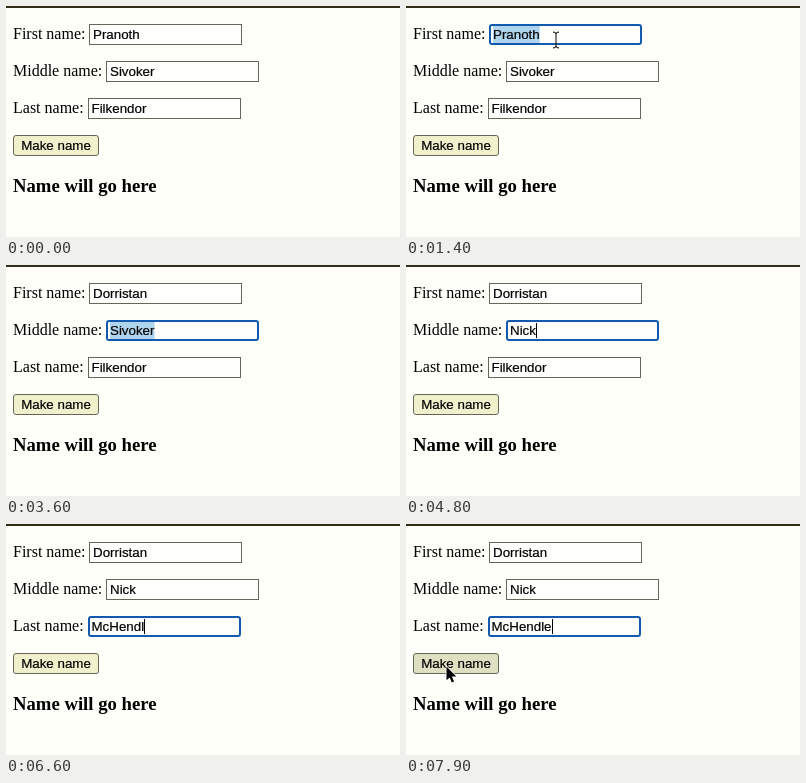
Animation of 394 by 231 pixels, one loop 8000 ms. Source, as an HTML page:

```html
<!DOCTYPE html>
<html lang="en">
<head>
<meta charset="utf-8">
<title>Name form</title>
<style>
  html, body { margin: 0; width: 100%; height: 100%; overflow: hidden; background: #fffffa; }
  svg { display: block; }
  text { fill: #000; }
  .serif { font: 16px "Liberation Serif", Times, serif; }
  .head { font: bold 18.72px "Liberation Serif", Times, serif; }
  .sans { font: 13.333px "Liberation Sans", Arial, sans-serif; stroke: #000; stroke-width: .2px; }
</style>
</head>
<body>
<svg id="stage" width="394" height="231" viewBox="0 0 394 231"></svg>
<script>
const LOOP = 8000, STEP = 100, BLINK = 500;
const INK = '#66655a', RING = '#125aae', BUTTON = '#f1f0cc', PRESSED = '#dfdfc2';
const stage = document.getElementById('stage');

function add(tag, attrs, text = '') {
  const el = document.createElementNS('http://www.w3.org/2000/svg', tag);
  set(el, attrs);
  el.textContent = text;
  stage.append(el);
  return el;
}
function set(el, attrs) {
  for (const k in attrs) el.setAttribute(k, attrs[k]);
}
function show(el, on) {
  el.style.display = on ? '' : 'none';
}

// Each field: focus and select times, then one time per typed letter.
const fields = [
  { label: 'First name:', x: 83, y: 18, pad: 4, before: 'Pranoth', after: 'Dorristan',
    focus: 1200, select: 1400, blur: 3600,
    keys: [2100, 2400, 2500, 2900, 3000, 3100, 3200, 3300, 3400] },
  { label: 'Middle name:', x: 100, y: 55, pad: 4, before: 'Sivoker', after: 'Nick',
    focus: 3600, select: 3600, blur: 5000, keys: [4300, 4500, 4600, 4800] },
  { label: 'Last name:', x: 82, y: 92, pad: 3.5, before: 'Filkendor', after: 'McHendle',
    focus: 5000, select: 5000, blur: LOOP,
    keys: [5400, 5600, 6000, 6300, 6400, 6500, 6600, 6800] }
];
const BOX_W = 153, BOX_H = 21;

add('rect', { width: 394, height: 2, fill: '#302d17' });

for (const f of fields) {
  const base = f.y + 15;
  add('text', { class: 'serif', x: 7, y: base }, f.label);
  f.box = add('rect', { fill: '#fffffd' });
  f.mark = add('rect', { x: f.x + f.pad, y: f.y + 2, height: 17, fill: '#afd4ee' });
  f.text = add('text', { class: 'sans', x: f.x + f.pad, y: base });
  f.caret = add('rect', { y: f.y + 3, width: 1, height: 15, fill: '#000' });
}

const button = add('rect', { x: 7.5, y: 129.5, width: 85, height: 20, rx: 2.5, stroke: INK });
add('text', { class: 'sans', x: 50, y: 144, 'text-anchor': 'middle' }, 'Make name');
add('text', { class: 'head', x: 7, y: 186 }, 'Name will go here');

const arrow = add('path', {
  d: 'M0 0V13.8L3.2 10.9 5.3 16 7.5 15 5.4 10.1H9.8Z',
  fill: '#000', stroke: '#fff', 'stroke-width': 1.6, 'paint-order': 'stroke'
});
const beam = add('path', {
  d: 'M-3 -8Q0 -8 0 -6Q0 -8 3 -8M0 -6V6M-3 8Q0 8 0 6Q0 8 3 8', fill: 'none', stroke: '#000'
});

// Mouse trips as [time, x, y]; typing hides the pointer.
const trips = [
  { end: 2100, path: [[100, 330, 232], [300, 250, 174], [600, 250, 174], [800, 186.5, 41.5], [1200, 150, 34]] },
  { end: LOOP, path: [[7200, 150, 34], [7800, 40.5, 142.5]] }
];

function pointAt(path, t) {
  for (let i = 1; i < path.length; i++) {
    const [t0, x0, y0] = path[i - 1], [t1, x1, y1] = path[i];
    if (t < t1) {
      const p = (t - t0) / (t1 - t0), e = p * p * (3 - 2 * p);
      return [x0 + (x1 - x0) * e, y0 + (y1 - y0) * e];
    }
  }
  return path[path.length - 1].slice(1);
}

// The border lies fully inside the box, whatever its width.
function drawBox(f, focused) {
  const line = focused ? 2 : 1;
  set(f.box, {
    x: f.x + line / 2, y: f.y + line / 2, width: BOX_W - line, height: BOX_H - line,
    rx: focused ? 2 : 0, stroke: focused ? RING : INK, 'stroke-width': line
  });
}

function drawField(f, t) {
  const typed = f.keys.filter(k => k <= t).length;
  const focused = t >= f.focus && t < f.blur;
  const selected = focused && t >= f.select && !typed;
  f.text.textContent = typed ? f.after.slice(0, typed) : f.before;
  drawBox(f, focused);

  const width = f.text.getComputedTextLength();
  set(f.mark, { width });
  show(f.mark, selected);
  const last = typed ? f.keys[typed - 1] : f.focus;
  set(f.caret, { x: Math.round(f.x + f.pad + width) });
  show(f.caret, focused && !selected && Math.floor((t - last) / BLINK) % 2 === 0);
}

function drawPointer(t) {
  const trip = trips.find(m => t >= m.path[0][0] && t < m.end);
  show(arrow, false);
  show(beam, false);
  if (!trip) return;
  const [x, y] = pointAt(trip.path, t);
  const inField = fields.some(f => x > f.x && x < f.x + BOX_W && y > f.y && y < f.y + BOX_H);
  const shape = inField ? beam : arrow;
  set(shape, { transform: `translate(${x} ${y})` });
  show(shape, true);
}

const start = performance.now();
function frame() {
  const t = Math.floor((performance.now() - start) % LOOP / STEP) * STEP;
  for (const f of fields) drawField(f, t);
  set(button, { fill: t >= 7900 ? PRESSED : BUTTON });
  drawPointer(t);
  requestAnimationFrame(frame);
}
frame();
</script>
</body>
</html>
```
